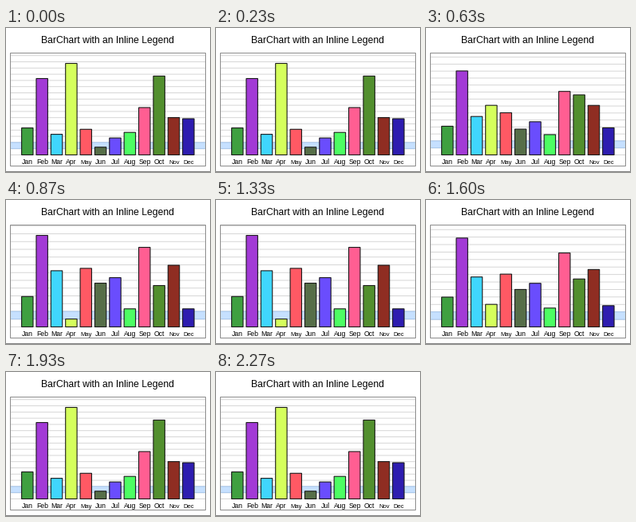
Recreate the animation shown at these times as a matplotlib script. Size 256 px wide and 181 px high, loop 2.31 s.

```python
import math

import matplotlib.pyplot as plt
from matplotlib.animation import FuncAnimation
from matplotlib.patches import Rectangle

W, H, DPI = 256, 181, 100
LOOP_MS, TICK_MS = 2310, 10
STEP_MS = 100 / 3
MORPH_MS = 400
FORTH_MS, BACK_MS = 433, 1490

BASE = 159.5
FIRST_X, PITCH, BAR_W = 26.8, 18.37, 14.4
GRID_A, GRID_B = 7.8, 9.75
LEFT, TOP, RIGHT, BOTTOM = 5.5, 31.5, 250.5, 173.5

# month, colour, bar top in the first and second data set
MONTHS = [
    ("Jan", "#3fa040", 125.6, 121.3),
    ("Feb", "#a23ad6", 63.5, 44.5),
    ("Mar", "#40d6fd", 133.6, 88.9),
    ("Apr", "#d5ff5c", 44.5, 149.6),
    ("May", "#ff5964", 127.3, 85.9),
    ("Jun", "#566e48", 149.8, 104.5),
    ("Jul", "#6a4dfd", 138.2, 97.6),
    ("Aug", "#4dfd63", 131.2, 136.8),
    ("Sep", "#ff5e92", 100, 59.5),
    ("Oct", "#528f2e", 60.4, 107.5),
    ("Nov", "#8f2d22", 112.6, 82),
    ("Dec", "#2e1db0", 114, 136.8),
]


def pt(px):
    return px * 72 / DPI


def mix(a, b, p):
    return a + (b - a) * p


def ease(ms):
    u = min(max(ms / MORPH_MS, 0), 1)
    return 0.5 - 0.5 * math.cos(math.pi * u)


def progress(tick):
    step = min(int((tick * TICK_MS + 4) / STEP_MS), 68)
    ms = step * STEP_MS
    return ease(ms - FORTH_MS) - ease(ms - BACK_MS)


def box(x, y, w, h, **style):
    return ax.add_patch(Rectangle((x, y), w, h, snap=False,
                                  joinstyle="miter", **style))


def rule(x0, x1, y, **style):
    return ax.plot([x0, x1], [y, y], snap=False, **style)[0]


fig = plt.figure(figsize=(W / DPI, H / DPI), dpi=DPI, facecolor="white")
ax = fig.add_axes([0, 0, 1, 1])
ax.set_xlim(0, W)
ax.set_ylim(H, 0)
ax.axis("off")

ax.text(128, 19.3, "BarChart with an Inline Legend", ha="center",
        va="baseline", family="Liberation Sans", size=pt(12.1))
rule(0, W, 180.5, color="#808080", lw=pt(1))

grid = [rule(LEFT, RIGHT, BASE, color="#d2d2d2", lw=pt(0.9), zorder=1)
        for _ in range(17)]
band = box(LEFT, BASE, RIGHT - LEFT, 1, fc="#c6e0ff", ec="#9cc0ea",
           lw=pt(0.8), zorder=2)
box(LEFT, TOP, RIGHT - LEFT, BOTTOM - TOP, fc="none", ec="#8c8c8c",
    lw=pt(1), zorder=3)

bars = []
for i, (name, color, *_) in enumerate(MONTHS):
    x = FIRST_X + i * PITCH
    bars.append(box(x - BAR_W / 2, BASE, BAR_W, 0, fc=color, ec="#1a1a1a",
                    lw=pt(1.1), zorder=4))
    size = 7.7 if name in ("May", "Nov", "Dec") else 8.7
    ax.text(x + 0.3, 171, name, ha="center", va="baseline",
            family="Liberation Sans", size=pt(size), zorder=5)


def draw(tick):
    p = progress(tick)
    gap = mix(GRID_A, GRID_B, p)
    for i, line in enumerate(grid):
        y = BASE - i * gap
        line.set_ydata([y, y])
        line.set_visible(y > TOP + 1)
    band.set_y(BASE - 2 * gap)
    band.set_height(gap)
    for bar, (_, _, first, second) in zip(bars, MONTHS):
        top = mix(first, second, p)
        bar.set_y(top)
        bar.set_height(BASE - top)
    return [*grid, band, *bars]


anim = FuncAnimation(fig, draw, frames=LOOP_MS // TICK_MS, interval=TICK_MS,
                     repeat=True, repeat_delay=0)
plt.show()
```
